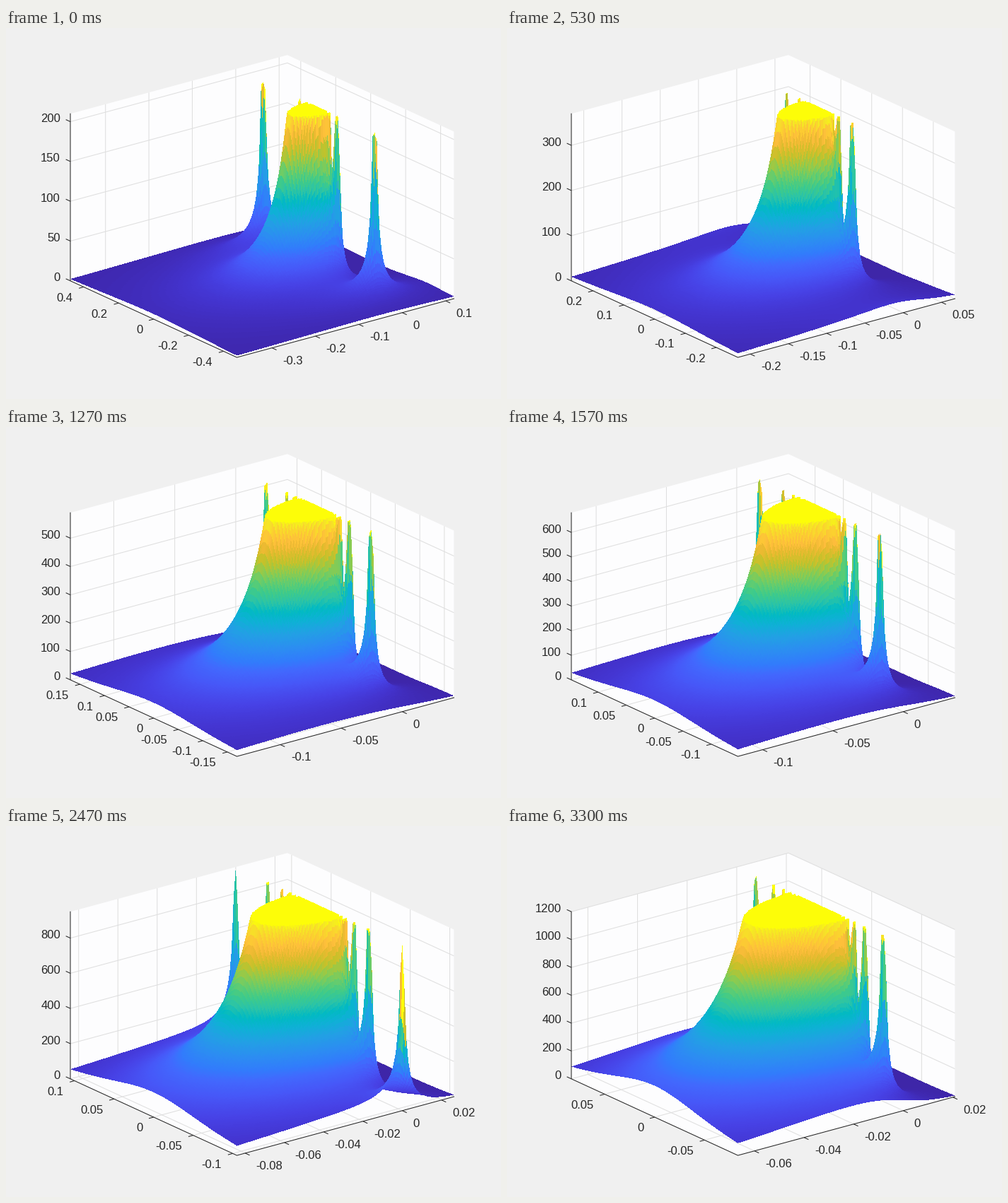
These frames come from a looping animation (700 by 525 pixels, 3.33 s). A matplotlib script:

```python
import math

import numpy as np
import matplotlib.pyplot as plt
from matplotlib.animation import FuncAnimation
from matplotlib.collections import LineCollection
from matplotlib.colors import LinearSegmentedColormap
from matplotlib.patches import Polygon

W, H = 700, 525
FRAMES, INTERVAL = 111, 30
INK, GRID, PAPER, WALL = "#262626", "#dfdfdf", "#f0f0f0", "#fdfdfe"

# Orthographic box: screen position of the front corner and the three edges
FRONT = np.array([326.5, 466.1])
EDGE_X = np.array([306.95, -83.1])
EDGE_Y = np.array([-235.5, -108.3])
EDGE_Z = np.array([0.0, -236.5])

# Mesh in units of the half height of the y axis
mesh_x = np.arange(-80, 26) / 100
mesh_y = np.arange(-100, 101) / 100
X_LO, X_HI = mesh_x[0], mesh_x[-1]
mesh = mesh_x + 1j * mesh_y[:, None]

PARULA = LinearSegmentedColormap.from_list("parula", [
    (0.00, "#3e26a8"), (0.05, "#4332cb"), (0.10, "#4741e5"),
    (0.16, "#4758f8"), (0.21, "#4269fe"), (0.25, "#327cfc"),
    (0.30, "#2d8cf3"), (0.37, "#23a0e5"), (0.43, "#0fb1d6"),
    (0.48, "#02bac3"), (0.53, "#2cc4a7"), (0.58, "#3fcb8a"),
    (0.63, "#64cd6f"), (0.68, "#8fcb4e"), (0.74, "#c5c22a"),
    (0.80, "#eaba30"), (0.84, "#febe3c"), (0.89, "#fcd030"),
    (0.95, "#f5e924"), (1.00, "#fdfd08"),
])
LUT = (PARULA(np.linspace(0, 1, 256)) * 255).astype(np.uint8)


def project(a, b, c):
    """Screen point of a box point given in fractions of its edges."""
    return FRONT + a * EDGE_X + b * EDGE_Y + c * EDGE_Z


# One sight line per screen column, sampled from the front edge to the back
LEFT, RIGHT, TOP, BOTTOM = 91, 634, 38, 467
SAMPLES = 450
cols = np.arange(LEFT, RIGHT) + 0.5
rows = np.arange(BOTTOM - 1, TOP - 1, -1) + 0.5
shift = cols - FRONT[0]
near = np.maximum(0, shift / EDGE_Y[0])
far = np.clip((EDGE_X[0] - shift) / -EDGE_Y[0], near, 1)
depth = near[:, None] + (far - near)[:, None] * np.linspace(0, 1, SAMPLES)
across = np.clip((shift[:, None] - EDGE_Y[0] * depth) / EDGE_X[0], 0, 1)
ground = FRONT[1] + EDGE_X[1] * across + EDGE_Y[1] * depth


def locate(part, count):
    """Mesh cell of each fraction and the place inside that cell."""
    pos = part * (count - 1)
    cell = np.minimum(pos.astype(int), count - 2)
    return cell, pos - cell


cell_x, in_x = locate(across, len(mesh_x))
cell_y, in_y = locate(depth, len(mesh_y))
corner = cell_y * len(mesh_x) + cell_x
corner_flat = corner.ravel()

# Offsets keep the columns apart so that one search serves them all
lane = 1000.0 * np.arange(len(cols))[:, None]
lane_of = np.repeat(lane.ravel(), len(rows))
first = np.repeat(np.arange(len(cols)) * SAMPLES, len(rows))
row_y = np.tile(rows, len(cols))


def heights(zmax):
    """|1 / (z^2 (1 + exp(1/z)))| on the mesh, cut off at zmax."""
    q = zmax / 100
    with np.errstate(all="ignore"):
        value = q / (100 * np.abs(mesh ** 2 * (1 + np.exp(q / mesh))))
    return np.fmin(1, value).ravel()


def surface(zmax):
    """Flat shaded image of the mesh; every cell has its front corner's colour."""
    h = heights(zmax)
    n = len(mesh_x)
    front = h[corner] * (1 - in_x) + h[corner + 1] * in_x
    back = h[corner + n] * (1 - in_x) + h[corner + n + 1] * in_x
    y = ground + EDGE_Z[1] * (front + (back - front) * in_y)

    # Above the front edge look for the first rise, below it for the first fall
    below = row_y > np.repeat(y[:, 0], len(rows))
    hit = np.empty(len(row_y), int)
    for side, sign, reach in ((~below, -1, np.minimum), (below, 1, np.maximum)):
        keys = (lane + sign * reach.accumulate(y, axis=1)).ravel()
        hit[side] = np.searchsorted(keys, lane_of[side] + sign * row_y[side])

    seen = (hit > first) & (hit < first + SAMPLES)
    i = hit[seen]
    yf = y.ravel()
    part = (yf[i - 1] - row_y[seen]) / (yf[i - 1] - yf[i])
    shade = h[corner_flat[i - (part < 0.5)]]

    image = np.zeros((len(row_y), 4), np.uint8)
    image[seen] = LUT[(shade * 255).astype(int)]
    return image.reshape(len(cols), len(rows), 4).transpose(1, 0, 2)[::-1]


def ticks(lo, hi):
    """Tick values and their fractions along an axis from lo to hi."""
    steps = (m * 10.0 ** e for e in range(-3, 4) for m in (1, 2, 5))
    step = next(s for s in steps if (hi - lo) / s <= 7 + 1e-9)
    start, stop = math.ceil(lo / step - 1e-9), math.floor(hi / step + 1e-9)
    return [(k * step, (k * step - lo) / (hi - lo)) for k in range(start, stop + 1)]


def unit(v):
    return v / np.hypot(*v)


fig = plt.figure(figsize=(W / 100, H / 100), dpi=100, facecolor=PAPER)
ax = fig.add_axes([0, 0, 1, 1])
ax.axis("off")

outline = [(0, 1, 1), (1, 1, 1), (1, 0, 1), (1, 0, 0), (0, 0, 0), (0, 1, 0)]
ax.add_patch(Polygon([project(*p) for p in outline], fc=WALL, ec="none", zorder=1))
grid = LineCollection([], colors=GRID, linewidths=0.75, zorder=2)
marks = LineCollection([], colors=INK, linewidths=0.75, zorder=4)
ax.add_collection(grid)
ax.add_collection(marks)
picture = ax.imshow(surface(210), extent=(LEFT, RIGHT, BOTTOM, TOP),
                    interpolation="nearest", aspect="auto", zorder=3)
axis_path = [project(*p) for p in [(0, 1, 1), (0, 1, 0), (0, 0, 0), (1, 0, 0)]]
ax.plot(*zip(*axis_path), color=INK, lw=0.75, zorder=4)
ax.set_xlim(0, W)
ax.set_ylim(H, 0)

OUT_X, OUT_Y, OUT_Z = -unit(EDGE_Y), -unit(EDGE_X), unit(EDGE_Y)
labels = []


def draw(frame):
    # 100 steps per loop, each starting on a multiple of 10 ms
    step = int(0.9 * frame + 0.75)
    zmax = 210 + 10 * step
    r = 100 / zmax
    picture.set_data(surface(zmax))
    for text in labels:
        text.remove()
    labels.clear()
    lines, stubs = [], []

    def tick(value, path, at, out, dx, dy, align):
        lines.append([project(*p) for p in path])
        point = project(*at)
        stubs.append([point, point + 7 * out])
        # the last 6 px bring the middle of the digits to the given height
        labels.append(ax.text(point[0] + dx, point[1] + dy + 6, f"{value:g}",
                              family="Liberation Sans", size=12, color=INK,
                              ha=align, va="baseline", zorder=5))

    for v, a in ticks(X_LO * r, X_HI * r):
        tick(v, [(a, 0, 0), (a, 1, 0), (a, 1, 1)], (a, 0, 0), OUT_X, 15, 17, "left")
    for v, b in ticks(-r, r):
        tick(v, [(0, b, 0), (1, b, 0), (1, b, 1)], (0, b, 0), OUT_Y, -15.5, 14.5, "right")
    for v, c in ticks(0, zmax):
        tick(v, [(0, 1, c), (1, 1, c), (1, 0, c)], (0, 1, c), OUT_Z, -14, -5.5, "right")
    grid.set_segments(lines)
    marks.set_segments(stubs)
    return [picture, grid, marks, *labels]


anim = FuncAnimation(fig, draw, frames=FRAMES, interval=INTERVAL,
                     repeat=True, repeat_delay=0, blit=False)
plt.show()
```
